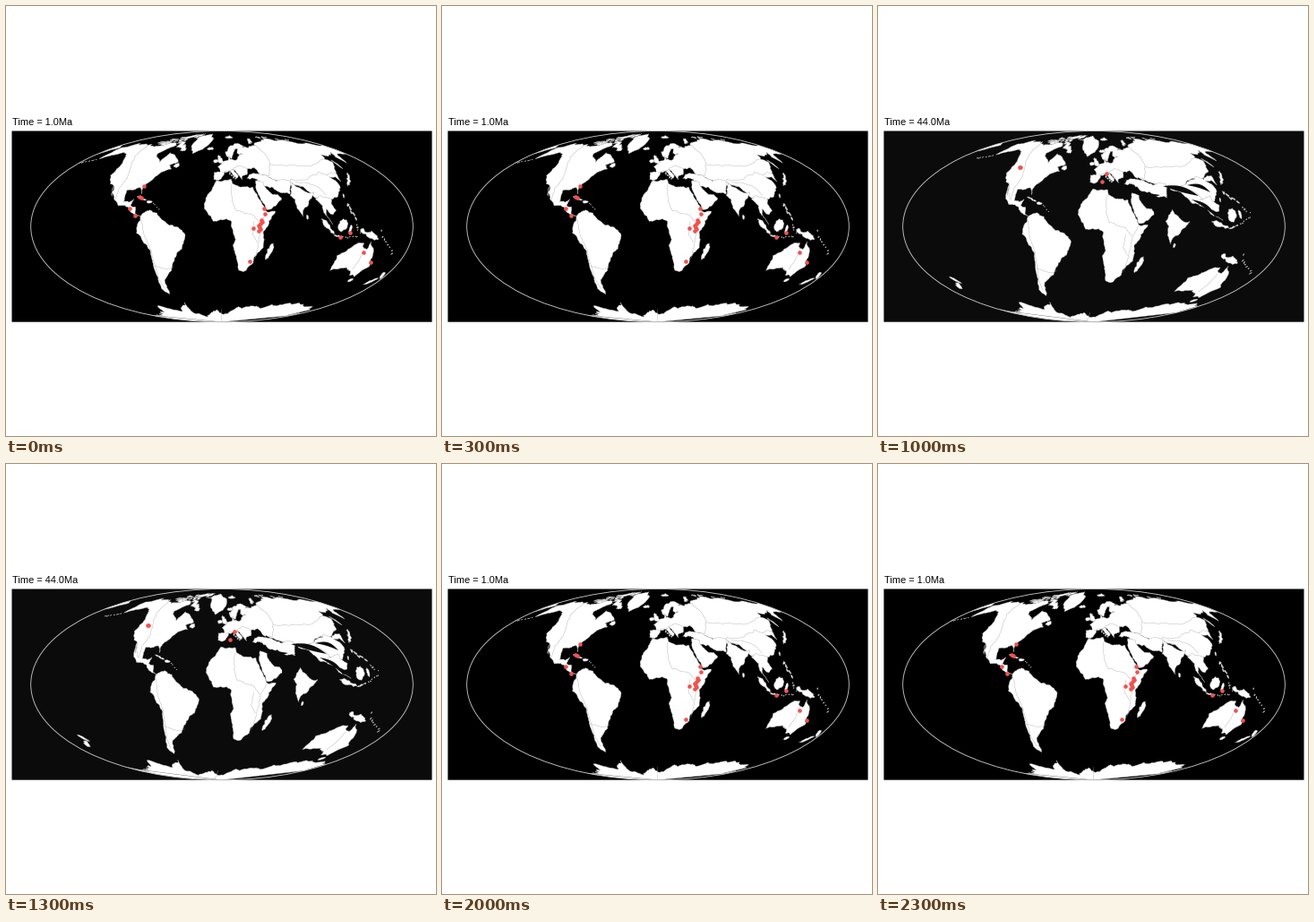
Write a matplotlib script that moves like this. It is 480x480 px and loops after 2500 ms.

```python
import numpy as np
import matplotlib.pyplot as plt
from matplotlib.animation import FuncAnimation
from matplotlib.patches import Ellipse, Polygon, Rectangle

SIZE, DPI = 480, 72
CX, CY, RX, RY = 241, 246.1, 213.3, 106.6
GREY, RED = "#a0a0a0", "#f0524f"

# Plate: anchor (lon, lat), then (lon, lat, ccw twist) at 12 Ma and at 44 Ma.
MOVES = {
    "AF": ((20, 0), (19.5, -3, -1.5), (19.5, -9.5, -5)),
    "AR": ((45, 24), (44, 20.5, -1), (45, 13, -4)),
    "EU": ((90, 50), (90.5, 49.7, 1.2), (91, 49, 4)),
    "TR": ((50, 34), (51, 33, 1), (54, 30, 4)),
    "CH": ((105, 28), (105.5, 28, 1), (108, 24, 3)),
    "IC": ((102, 18), (103, 18, 3), (112, 18, 30)),
    "IN": ((79, 20), (78.5, 15.5, -2), (77, -2, -8)),
    "AU": ((134, -25), (131, -31.5, 0), (129.5, -45, 0)),
    "PA": ((172, -42), (184, -43, 0), (199, -46, 0)),
    "NA": ((-95, 45), (-89.5, 45.5, -1.5), (-74, 45.5, -6)),
    "CO": ((-112, 45), (-106, 45.5, -1.5), (-86, 46, -6)),
    "GR": ((-42, 70), (-34, 69.3, 0), (-8, 67, 0)),
    "SA": ((-60, -15), (-57.5, -16.3, -1.5), (-48, -18, -6)),
    "AN": ((30, -69), (30, -70.5, 0), (30, -74, 0)),
}

rng = np.random.default_rng(4)
lands, seams = [], []


def fractal(pts, bend, closed):
    """Midpoint displacement: every pass halves the edges and bends them."""
    pts = np.array(pts, float).reshape(-1, 2)
    if closed:
        pts = np.vstack([pts, pts[:1]])
    for _ in range(4):
        step = np.diff(pts, axis=0)
        side = np.column_stack([-step[:, 1], step[:, 0]])
        mid = pts[:-1] + step / 2 + side * rng.normal(0, bend, (len(step), 1))
        pts = np.vstack([np.stack([pts[:-1], mid], 1).reshape(-1, 2), pts[-1:]])
    return pts


def land(plate, *xy, closed=True):
    lands.append((plate, fractal(xy, 0.08, closed)))


def seam(plate, *xy):
    seams.append((plate, fractal(xy, 0.04, False)))


def island(plate, lon, lat, length, width, tilt=0):
    """Rough ellipse, sizes in degrees of arc."""
    a = np.linspace(0, 2 * np.pi, 9)[:-1]
    c, s = np.cos(np.radians(tilt)), np.sin(np.radians(tilt))
    u, v = length / 2 * np.cos(a), width / 2 * np.sin(a)
    x = lon + (u * c - v * s) / np.cos(np.radians(lat))
    lands.append((plate, fractal(np.column_stack([x, lat + u * s + v * c]),
                                 0.12, True)))


def islets(plate, count, start, end, spread, size):
    """Random small islands along a line."""
    for t in np.linspace(0, 1, count):
        lon, lat = np.add(start, np.subtract(end, start) * t)
        lon, lat = (lon, lat) + rng.normal(0, spread, 2)
        island(plate, lon, lat, size * rng.uniform(0.7, 1.6), size * 0.6,
               rng.uniform(0, 180))


# Antarctica
land("AN", -180, -78, -158, -78, -130, -74, -80, -73, -67, -67, -58, -63,
     -62, -75, -35, -78, -10, -71, 35, -69, 55, -67, 72, -69, 90, -66.5,
     135, -66.3, 170, -71.5, 165, -77.5, 180, -78, closed=False)

# Eurasia
land("EU", 58, 69, 68, 72, 104, 77.7, 113, 74, 140, 73, 180, 69, 190, 66,
     163, 58, 157, 51, 156, 57, 163, 61.5, 142, 59, 136, 54.5, 141, 52,
     130, 42.5, 105, 38, 90, 33, 62, 35, 47, 40, 45, 45, 58, 50)
land("EU", -9, 37, -9, 43, -2, 43.5, -5, 48, 8, 54, 10, 58, 11, 54.5,
     20, 54.5, 30, 60, 22, 60.5, 25, 65, 17, 61, 13, 55.5, 6, 58, 5, 62,
     14, 68, 25, 71, 41, 67, 34, 66.5, 44, 66, 60, 69, 60, 50, 52, 40,
     42, 41.5, 38, 47, 30, 46, 28, 41, 23, 40, 22, 36.7, 13, 45.5, 18, 40,
     16, 38, 9, 44, 3, 43, -2, 37)
land("TR", 27, 38, 31, 41.3, 42, 41.5, 54, 37.5, 72, 36, 68, 25, 57, 27,
     49, 30, 38, 37)
land("CH", 130, 42.5, 127, 35, 125, 39, 118, 39, 122, 36, 122, 30, 114, 22.5,
     108, 21, 92, 22, 88, 27, 74, 33.5, 74, 37, 105, 41)
land("IC", 108, 21.5, 106, 18, 109, 12, 105, 9, 100, 13.5, 99, 10, 104, 1.5,
     98, 9, 97, 16, 92, 21, 98, 24)
land("IN", 68, 24, 72, 21, 77, 8, 80, 15, 87, 21.5, 93, 27, 80, 30.5,
     74, 34.5)
land("AR", 35, 29, 43, 13, 52, 16, 59, 22, 56, 25, 51, 25, 44, 35, 36, 36)

# Africa and Oceania
land("AF", -6, 36, 10, 37.3, 11, 34, 20, 31, 32, 31, 37, 21, 43, 11.5,
     51, 12, 39, -4, 40, -16, 35, -20, 32, -28, 26, -34, 18, -34, 12, -18,
     13, -10, 9, 0, 9, 4, 4, 6, -8, 4, -17, 14, -16, 22, -10, 30)
land("AU", 114, -22, 115, -34, 131, -31.5, 140, -38, 147, -39, 153, -30,
     149, -21, 145, -15, 142.5, -11, 141, -17, 136, -15, 136, -12, 131, -12,
     122, -18)

# Americas
land("NA", -135, 69, -115, 68, -94, 72, -82, 69, -94, 60, -80, 52, -77, 61,
     -68, 59, -56, 52, -65, 49, -60, 46, -70, 43, -76, 36, -81, 31, -80.5, 25,
     -84, 30, -97, 28, -96, 19, -91, 18.5, -87, 21, -88.5, 16, -83.5, 15,
     -83, 10, -77.5, 8, -85, 10, -94, 16, -105, 20, -107, 40, -120, 56)
land("CO", -105, 20, -113, 31, -109.5, 23.2, -117, 33, -124.5, 40, -124, 48,
     -135, 58, -147, 61, -164, 54.8, -168, 66, -157, 71, -133, 69, -116, 54,
     -104, 38)
land("GR", -73, 78, -35, 83.5, -20, 77, -24, 70, -43, 60, -53, 67, -57, 76)
land("SA", -77.5, 8, -72, 12, -62, 10.5, -50, 1, -35, -6, -39, -17, -48, -26,
     -57, -36, -65, -42, -68, -53, -70, -55, -75, -50, -71, -30, -70, -18.5,
     -81, -5, -80, 1)

# Islands
island("AF", 46.5, -19, 14, 4.5, 70)
island("EU", -2.5, 54.5, 9, 3.5, 110)
island("EU", -8, 53, 4, 3)
island("EU", 18, 78.5, 4, 3)
island("EU", 58, 73.5, 8, 2, 60)
island("EU", 137, 37, 15, 2.5, 48)
island("EU", 143, 50, 8, 1.2, 90)
island("CH", 121, 23.6, 3.4, 1.4, 70)
island("IN", 81, 7.5, 3.5, 2, 90)
island("IC", 100, 0, 17, 3.5, -45)
island("IC", 110, -7.3, 9, 1.3, -8)
island("IC", 114, 1, 11, 8, 45)
island("IC", 121, -2, 7, 2.5, 70)
island("AU", 140, -5.5, 20, 5, -22)
island("AU", 146.5, -42, 3.5, 3)
island("PA", 175, -38.5, 7, 2.5, -55)
island("PA", 170.5, -43.5, 8, 2.5, 45)
island("GR", -19, 65, 4.5, 2.5)
island("NA", -56, 49, 4.5, 4)
island("NA", -72, 68, 15, 5, -45)
island("NA", -110, 71, 6, 4.5)
island("NA", -80, 79.5, 9, 5, 45)
island("NA", -79.5, 21.7, 10, 1.3, -17)
island("NA", -71, 19, 5.5, 2)
islets("NA", 14, (-122, 73), (-85, 76), 1.5, 2.5)
islets("NA", 4, (-67, 18), (-61, 13), 0.4, 0.7)
islets("CO", 6, (-166, 54), (-180, 51.5), 0.2, 0.9)
islets("EU", 4, (9, 42), (15, 37.5), 0.3, 1.6)
islets("EU", 4, (95, 79), (145, 75), 0.5, 1.5)
islets("IC", 9, (121, 17), (126, 7), 0.8, 1.9)
islets("IC", 7, (115, -8.3), (128, -8), 0.4, 1)
islets("IC", 5, (127, 1), (130, -4), 0.7, 1.1)
islets("AU", 8, (150, -5), (168, -20), 0.8, 1.3)

# Plate seams inside the continents
seam("AF", 10, 33, 10, 20, 14, 12, 30, 9, 36, 3)
seam("AF", 42, 11, 37, 3, 35, -14, 33, -25)
seam("AF", 30, 4, 29, -6, 34, -12)
seam("SA", -71, -31, -50, -31)
seam("SA", -77, 6, -69, -18, -71, -50)
seam("EU", 60, 50, 85, 49, 135, 55)
seam("EU", 0, 43, 20, 49, 30, 46)
seam("CH", 78, 35, 100, 30, 104, 24)
seam("AU", 138, -17, 138, -33)
seam("AN", 0, -70, 0, -89)


def spin(axis, deg):
    """Rotation matrix about one of the axes 0, 1, 2."""
    c, s = np.cos(np.radians(deg)), np.sin(np.radians(deg))
    i, j = (axis + 1) % 3, (axis + 2) % 3
    m = np.eye(3)
    m[i, i] = m[j, j] = c
    m[i, j], m[j, i] = -s, s
    return m


def rotate(plate, pts, age):
    (lon0, lat0), mid, old = MOVES[plate]
    keys = zip((lon0, lat0, 0), mid, old)
    lon1, lat1, twist = (np.interp(age, (0, 12, 44), k) for k in keys)
    m = (spin(2, lon1) @ spin(1, -lat1) @ spin(0, twist)
         @ spin(1, lat0) @ spin(2, -lon0))
    lon, lat = np.radians(pts).T
    x, y, z = m @ [np.cos(lat) * np.cos(lon), np.cos(lat) * np.sin(lon),
                   np.sin(lat)]
    lon = np.unwrap(np.degrees(np.arctan2(y, x)), period=360)
    return lon, np.degrees(np.arcsin(np.clip(z, -1, 1)))


THETA = np.linspace(-np.pi / 2, np.pi / 2, 2001)
SIN_LAT = (2 * THETA + np.sin(2 * THETA)) / np.pi


def mollweide(lon, lat):
    t = np.interp(np.sin(np.radians(lat)), SIN_LAT, THETA)
    return np.column_stack([CX + RX * lon / 180 * np.cos(t), CY - RY * np.sin(t)])


fig = plt.figure(figsize=(SIZE / DPI, SIZE / DPI), dpi=DPI, facecolor="white")
ax = fig.add_axes([0, 0, 1, 1])
ax.set(xlim=(0, SIZE), ylim=(SIZE, 0))
ax.axis("off")

panel = ax.add_patch(Rectangle((6.5, 139.5), 469, 213.2, fc="black", ec="none",
                               snap=False))
globe = ax.add_patch(Ellipse((CX, CY), 2 * RX, 2 * RY, fill=False,
                             ec="#c4c4c4", lw=0.9, zorder=5))
label = ax.text(6.8, 133, "", family="Liberation Sans", size=11, color="black")


def place(plate, pts, age, closed):
    """Draw a shape, with copies that wrap round the date line."""
    lon, lat = rotate(plate, pts, age)
    if closed and abs(lon[-1] - lon[0]) > 300:
        lon = np.append(lon, [lon[-1], lon[0]])
        lat = np.append(lat, [-90, -90])
    made = []
    for turn in (-360, 0, 360):
        if lon.max() + turn < -180 or lon.min() + turn > 180:
            continue
        shape = Polygon(mollweide(lon + turn, lat), closed=closed, fill=closed,
                        fc="white", ec=GREY, lw=0.35, zorder=2 if closed else 3)
        ax.add_patch(shape)
        shape.set_clip_path(globe)
        made.append(shape)
    return made


def strait(back, start, end, bow, width):
    """Tapered dark arc between two points."""
    t = np.linspace(0, 1, 24)[:, None]
    a, d = np.array(start), np.subtract(end, start)
    side = np.array([-d[1], d[0]]) / np.hypot(*d)
    arc = np.sin(np.pi * t)
    mid = a + d * t + side * bow * arc
    edge = np.vstack([mid + side * width / 2 * arc,
                      (mid - side * width / 2 * arc)[::-1]])
    return ax.add_patch(Polygon(edge, fc=back, ec="none", zorder=4))


def scene(age, back, straits, dots):
    made = []
    for plate, pts in lands:
        made += place(plate, pts, age, True)
    for plate, pts in seams:
        made += place(plate, pts, age, False)
    made += [strait(back, *s) for s in straits]
    x, y = np.array(dots).T
    made += ax.plot(x, y, "o", ms=4.6, mfc=RED, mec="none", zorder=6)
    return age, back, made


rift = [(285 - 3 * t + 1.2 * np.sin(9 * t), 239 + 12 * t)
        for t in np.linspace(0, 1, 7)]
scenes = [
    scene(1, "black", [], rift + [
        (154, 201), (149, 213), (151, 213.5), (137.5, 226), (144, 233.5),
        (288, 225.5), (289, 231.5), (276, 247.5), (271.5, 285), (373, 257.5),
        (384, 252.5), (398.5, 275), (406.5, 286)]),
    scene(12, "black", [((317, 206), (349, 211), -5, 4),
                        ((328, 191), (350, 207), -3, 4)], [
        (170.5, 190), (252, 201.5), (335, 217.5), (337, 218), (282.5, 251.5),
        (280.5, 258), (257, 293)]),
    scene(44, "#0b0b0b", [((283, 203), (315, 211), 4, 6),
                          ((301, 208), (308, 234), -5, 5),
                          ((318, 201), (358, 212), -2, 6),
                          ((321, 212), (353, 229), -4, 6),
                          ((316, 224), (336, 214), -2, 5),
                          ((345, 200), (371, 208), -3, 4),
                          ((350, 216), (378, 236), -3, 4)], [
        (157.5, 180), (158.5, 179.5), (255, 187), (249.5, 196)]),
]
ORDER = (0, 1, 2, 1, 0)


def draw(i):
    for k, (age, back, made) in enumerate(scenes):
        on = k == ORDER[i]
        for artist in made:
            artist.set_visible(on)
        if on:
            panel.set_facecolor(back)
            label.set_text(f"Time = {age:.1f}Ma")


anim = FuncAnimation(fig, draw, frames=len(ORDER), interval=500,
                     init_func=lambda: draw(0), repeat=True, repeat_delay=0)
plt.show()
```
